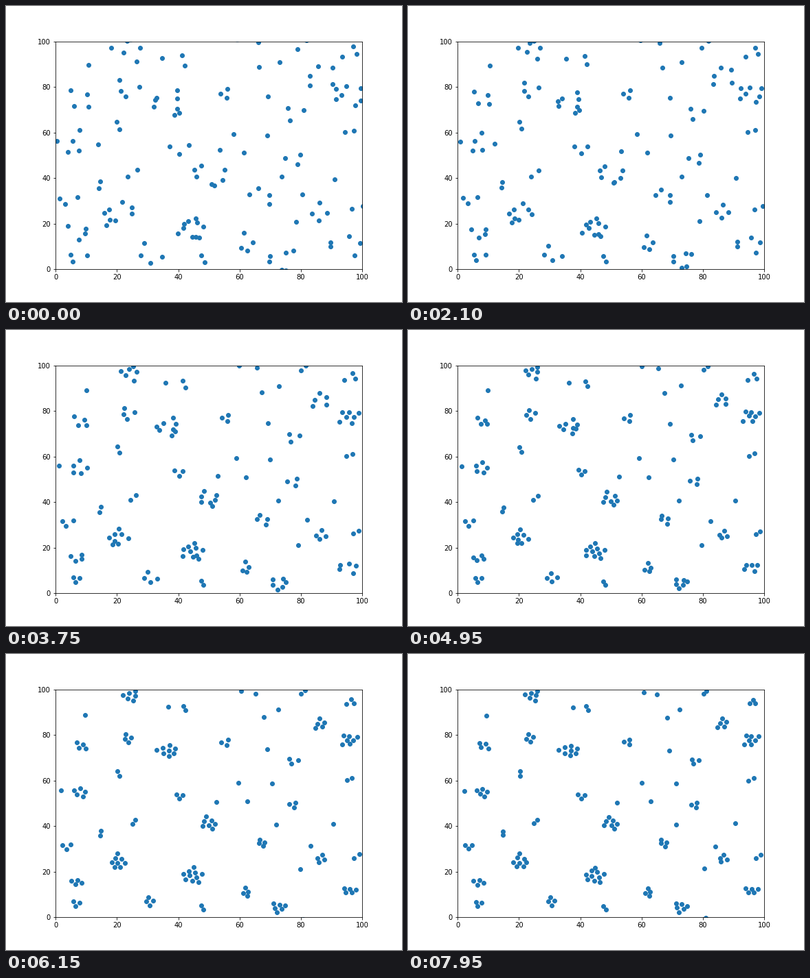
A matplotlib script for the animation above (8000 ms loop, 576 by 432 pixels).

```python
import numpy as np
import matplotlib.pyplot as plt
from matplotlib.animation import FuncAnimation

FRAME_MS, LOOP_MS, STEP_MS = 50, 8000, 150
FRAMES = LOOP_MS // FRAME_MS
HOLD = STEP_MS // FRAME_MS
STEPS = -(-FRAMES // HOLD)

# Lone particles: start x, y and end x, y
DRIFTERS = np.array([
    (0.4, 56.3, 2.2, 55.4), (34.7, 92.6, 37.6, 92.2), (59.2, 101, 60.8, 98.6),
    (66, 99.7, 65, 97.8), (66.3, 88.7, 68.4, 87.6), (69.3, 76, 69, 73.2),
    (58.1, 59.4, 60, 59.1), (69.1, 58.8, 71.2, 58.8), (61.4, 51.2, 63, 50.9),
    (53.6, 52.4, 52, 50.2), (73.6, 40.8, 71.2, 40.7), (90.9, 39.6, 90.4, 41.4),
    (78.3, 21, 80.4, 21.4), (80.5, 33, 84, 31), (10.8, 89.8, 9.3, 88.5),
    (73.1, 90.8, 72.4, 91.3), (80.2, -2.5, 80.8, 0),
])

# Cluster size -> centres where particles gather
CLUSTERS = {
    2: [(42.2, 91.8), (80.6, 98.7), (20.6, 63.3), (95.9, 60.7),
        (25.4, 42), (14.8, 36.9), (47.8, 4.2), (98, 26.8)],
    3: [(96.2, 94.4), (55.4, 76.8), (77.4, 68.7), (40.4, 53.3),
        (77.2, 49.6), (3.5, 31.4), (6.8, 6.2)],
    4: [(8.5, 75.4), (23.4, 78.7), (6.7, 15.4), (30.6, 7.2),
        (67.2, 32.7), (62.2, 11.2), (86.5, 25.8)],
    5: [(86.2, 84.9), (8, 55), (95.8, 11.9)],
    6: [(24.4, 97.4), (72.7, 4.5)],
    7: [(95.6, 78), (49.9, 41.4)],
    8: [(36.4, 73.3), (20.5, 24.6)],
    10: [(44.7, 18.5)],
}

rng = np.random.default_rng(7)


def polar(radius, angle):
    return np.column_stack([radius * np.cos(angle), radius * np.sin(angle)])


def packed(count):
    """Offsets of a compact, randomly turned hexagonal packing."""
    grid = np.array([(i + j / 2, j * 3 ** 0.5 / 2)
                     for i in range(-4, 5) for j in range(-4, 5)])
    distance = np.hypot(*(grid - (0.5, 0.29)).T)
    points = grid[np.argsort(distance, kind="stable")[:count]]
    points = (points - points.mean(axis=0)) * (1.85 + 0.04 * count)
    radius, angle = np.hypot(*points.T), np.arctan2(points[:, 1], points[:, 0])
    return polar(radius, angle + rng.uniform(0, 2 * np.pi))


def gather(count, centre):
    """Start and end positions of one cluster."""
    end = packed(count) + rng.normal(0, 0.12, (count, 2))
    angle = np.arctan2(end[:, 1], end[:, 0]) + rng.normal(0, 0.35, count)
    start = polar(rng.uniform(0.5, 1.3, count) * min(count, 5), angle)
    return np.hstack([centre + start, centre + end])


paths = np.vstack([gather(count, centre)
                   for count, centres in CLUSTERS.items()
                   for centre in np.array(centres)])
arrival = rng.uniform(3500, 7200, len(paths))
paths = np.vstack([paths, DRIFTERS])
arrival = np.append(arrival, np.full(len(DRIFTERS), LOOP_MS))
starts, ends = paths[:, :2], paths[:, 2:]
wobble = rng.normal(0, 0.1, (STEPS, len(paths), 2))
wobble[:, -len(DRIFTERS):] = 0

fig, ax = plt.subplots(figsize=(8, 6), dpi=72)
ax.set(xlim=(0, 100), ylim=(0, 100))
dots, = ax.plot([], [], "o", color="#1f77b4", markersize=6)


def update(frame):
    step = frame // HOLD
    progress = np.minimum(step * STEP_MS / arrival, 1)[:, None] ** 1.15
    points = starts + (ends - starts) * progress + wobble[step] * progress
    dots.set_data(points[:, 0], points[:, 1])
    return dots,


anim = FuncAnimation(fig, update, frames=FRAMES, interval=FRAME_MS,
                     repeat=True, repeat_delay=0)
plt.show()
```
